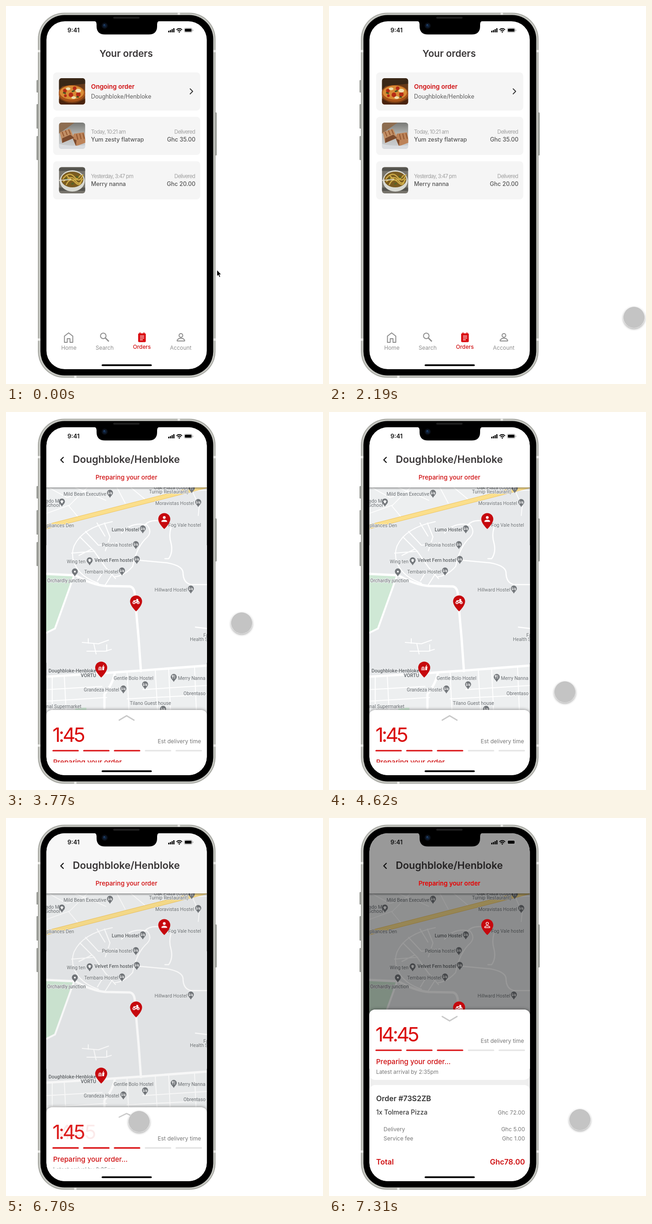
An HTML page that plays this animation: 686 px wide and 817 px high, repeating every 8 s.

```html
<!DOCTYPE html>
<html lang="en">
<head>
<meta charset="utf-8">
<title>Order tracking</title>
<style>
@property --open { syntax: "<number>"; inherits: true; initial-value: 0; }

html, body { margin: 0; width: 100%; height: 100%; overflow: hidden; background: #fff; }
svg { display: block; width: 686px; height: 817px; --open: 0; animation: open 8s step-end infinite; }
text { font: 12px Inter, sans-serif; fill: #777; }
.title { font-size: 20.5px; font-weight: 600; fill: #393637; }
.mid { text-anchor: middle; }
.end { text-anchor: end; }
.red { fill: #cf0d0f; }
.status { font-size: 13.5px; font-weight: 500; }
.meta text { font-size: 11.5px; letter-spacing: -.75px; fill: #a0a0a0; }
.item { font-size: 12.4px; font-weight: 500; fill: #555; }
.line { fill: none; stroke-linecap: round; stroke-linejoin: round; }
.tab { fill: none; stroke: #8e8e8e; stroke-width: 2; stroke-linejoin: round; }
.tabs text { font-size: 11.8px; fill: #8e8e8e; text-anchor: middle; }
.labels text { font: 10.4px Roboto, sans-serif; fill: #6d7175; stroke: #eef0f1; stroke-width: 2px; paint-order: stroke; }
.labels .strong { font-weight: 500; fill: #5d6165; }
.clock { font-size: 43px; font-weight: 400; letter-spacing: -4px; fill: #da0c0c; }
.total { font-size: 16px; font-weight: 600; }

.tracking { animation: reveal 8s step-end infinite; }
.dim { opacity: calc(var(--open) * .4); }
.fade-in { opacity: var(--open); }
.fade-out { opacity: calc(1 - var(--open)); }
.sheet { transform: translateY(calc(644px - 230px * var(--open))); }
.back { filter: drop-shadow(0 -1px 3px #0006); }
.handle { transform: translate(261px, calc(17px + 3px * var(--open))) scaleY(calc(1 - 2 * var(--open))); }
.arrow { animation: arrow 8s step-end infinite; }
.touch { animation: touch 8s step-end infinite; filter: drop-shadow(0 2px 2px #0005); }

@keyframes arrow { 0% { opacity: 1 } 1.625%, 100% { opacity: 0 } }
@keyframes reveal {
  0% { opacity: 0 }
  41.125% { opacity: 0; animation-timing-function: steps(4, start) }
  44.8%, 100% { opacity: 1 }
}
@keyframes open {
  0% { --open: 0 }
  83.75% { --open: .082 }
  84.75% { --open: .42 }
  86.5% { --open: .85 }
  87.4% { --open: .97 }
  88.3%, 100% { --open: 1 }
}
@keyframes touch {
  0% { translate: 457px 571px; opacity: 0 }
  1.625% { translate: 457px 571px; opacity: 1; animation-timing-function: steps(7, start) }
  7.75% { translate: 657px 648px; opacity: 1 }
  9.875% { translate: 657px 648px; animation-timing-function: steps(3, start) }
  12.625% { translate: 660px 682px }
  13.875% { translate: 660px 682px; animation-timing-function: steps(2, start) }
  15.5% { translate: 660px 687px }
  27.375% { translate: 660px 673px }
  28.375% { translate: 660px 673px; animation-timing-function: steps(3, start) }
  31.1875% { translate: 575px 550px; animation-timing-function: steps(2, start) }
  33.0625% { translate: 425px 315px; animation-timing-function: steps(2, start) }
  35% { translate: 351px 207px }
  36.25% { translate: 351px 207px; animation-timing-function: steps(4, start) }
  39.9% { translate: 341px 187px }
  44.125% { translate: 341px 187px; animation-timing-function: steps(4, start) }
  48% { translate: 510px 456px; animation-timing-function: steps(4, start) }
  51.75% { translate: 517px 550px; animation-timing-function: steps(7, start) }
  58.625% { translate: 510.5px 605px }
  67.125% { translate: 510.5px 605px; animation-timing-function: steps(11, start) }
  77.5% { translate: 272px 655px }
  77.625% { translate: 270px 657px }
  79.5% { translate: 270px 657px; animation-timing-function: steps(3, start) }
  82.375% { translate: 268px 658px }
  83.75% { translate: 288px 656px }
  84.75% { translate: 300px 655px }
  86.5% { translate: 300px 655px; animation-timing-function: steps(6, start) }
  92.3%, 100% { translate: 543px 652px; opacity: 1 }
}
</style>
</head>
<body>
<svg viewBox="0 0 686 817">
  <defs>
    <clipPath id="screen"><rect x="87.500" y="33" width="347" height="752" rx="40"/></clipPath>
    <clipPath id="thumb"><rect width="57" height="57" rx="6"/></clipPath>
    <linearGradient id="shade" x2="0" y2="1">
      <stop stop-color="#000" stop-opacity=".36"/><stop offset="1" stop-color="#000" stop-opacity="0"/>
    </linearGradient>
    <linearGradient id="wood" x2="0" y2="1">
      <stop stop-color="#5f3a1d"/><stop offset="1" stop-color="#7a3c12"/>
    </linearGradient>
    <linearGradient id="cloth" x2="0" y2="1">
      <stop stop-color="#787975"/><stop offset=".45" stop-color="#b6b7b5"/><stop offset="1" stop-color="#cfd2d5"/>
    </linearGradient>
    <rect id="card" x="102" width="318.500" height="82.500" rx="8" fill="#f5f5f5"/>
    <path id="drop" d="M0 21S-13 9-13-.500a13 13 0 0 1 26 0C13 9 0 21 0 21z" fill="#c6080d"/>
    <path id="dot" d="M0 9.500C-2 5-6.500 3-6.500-1.500a6.500 6.500 0 0 1 13 0C6.500 3 2 5 0 9.500z" fill="#74787c"/>
    <g id="bed"><use href="#dot"/><path d="M-3.500-4V2M-3.500.500h7V2M-1-2h4.500V.500" class="line" stroke="#fff" stroke-width="1.200"/></g>
    <g id="cap"><use href="#dot"/><path d="M-4-2 0-4.500 4-2 0 .500zM-2 0v2h4V0z" fill="#fff"/></g>
    <g id="fork"><use href="#dot"/><path d="M-2-5v7M2-5v7M-3.200-5v3h2.400v-3" class="line" stroke="#fff"/></g>
  </defs>

  <!-- phone body -->
  <g fill="#999b96">
    <rect x="66" y="160" width="6" height="27" rx="1.500"/><rect x="66" y="212" width="6" height="53" rx="1.500"/>
    <rect x="66" y="281" width="6" height="52" rx="1.500"/><rect x="450" y="230" width="6" height="93" rx="1.500"/>
  </g>
  <rect x="69" y="14.500" width="384.500" height="789" rx="57" fill="#a8a9a3"/>
  <rect x="71" y="16.500" width="380.500" height="785" rx="55" fill="#c6c7c2"/>
  <path d="M374 14.500v5M150 799v5M69 97.500h6M448 97.500h6M69 721h6M448 721h6" stroke="#e9e9e6" stroke-width="5"/>
  <rect x="74.500" y="19.500" width="374" height="779" rx="52"/>

  <g clip-path="url(#screen)">
    <rect x="87" y="33" width="348" height="752" fill="#fff"/>

    <!-- order list -->
    <g>
      <text class="title mid" x="260" y="110">Your orders</text>
      <use href="#card" y="143.500"/><use href="#card" y="239.500"/><use href="#card" y="335.500"/>

      <g transform="translate(114.500 156)" clip-path="url(#thumb)">
        <path d="M0 0h57v57H0z" fill="url(#wood)"/>
        <path d="M0 0h57v12L8 17 0 25z" fill="#392717"/>
        <ellipse cx="28" cy="33" rx="29" ry="18" fill="#a85319"/>
        <ellipse cx="28" cy="31" rx="26" ry="15" fill="#d88b35"/>
        <g fill="#b52b16"><circle cx="13" cy="27" r="4"/><circle cx="26" cy="36" r="5"/><circle cx="42" cy="35" r="5"/><circle cx="34" cy="22" r="4"/><circle cx="14" cy="38" r="3"/></g>
        <g fill="#eedfb0"><ellipse cx="20" cy="23" rx="5" ry="3"/><ellipse cx="42" cy="27" rx="6" ry="4"/><ellipse cx="32" cy="42" rx="5" ry="3"/></g>
        <path d="M9 31l6 2M28 29l6-2M38 40l5 1" stroke="#455021" stroke-width="3"/>
        <path d="M0 44q28 20 57 0v13H0z" fill="#4a230d"/>
      </g>
      <g transform="translate(114.500 252)" clip-path="url(#thumb)">
        <path d="M0 0h57v57H0z" fill="url(#cloth)"/>
        <path d="M0 0h34L0 24z" fill="#8d6d50"/>
        <path d="M2 21 24 13l9 20-26 11z" fill="#c18e64"/><path d="M32 24l22-3 5 22-22 8-7-16z" fill="#bd8358"/>
        <path d="M7 34l18-8 8 7-26 11zM30 34l8 4-1 13z" fill="#7c4b2e"/>
        <path d="M7 20l4 10M14 17l4 10M21 15l4 10M38 25l3 12M45 24l3 12M52 23l3 12" stroke="#91552f" stroke-width="2"/>
        <path d="M0 46q22 6 57 3v8H0z" fill="#d9dce0"/>
      </g>
      <g transform="translate(114.500 348)" clip-path="url(#thumb)">
        <path d="M0 0h57v57H0z" fill="#77746c"/>
        <path d="M0 5h57M0 48h57" stroke="#55544f" stroke-width="7"/>
        <ellipse cx="29" cy="30" rx="27" ry="23" fill="#d9dad3"/>
        <ellipse cx="29" cy="27" rx="24" ry="17" fill="#7a5b20"/>
        <path class="line" d="M9 25q14-17 25-3t18-5M10 31q18-15 26-2t15-3M16 38q8-17 19-5t14-5M17 18q14 20 30 0" stroke="#cfad49" stroke-width="2.500"/>
        <path d="M14 25l5 2M37 20l5 3M27 37l5-2" stroke="#526428" stroke-width="3"/>
        <path d="M0 29l26-2" stroke="#e2dccb" stroke-width="2"/>
      </g>

      <text class="red" x="184" y="179" style="font-size:13.500px;font-weight:600">Ongoing order</text>
      <text x="184" y="200" style="font-size:12.400px;fill:#5c5c5c">Doughbloke/Henbloke</text>
      <path class="line" d="M398.500 179l5.500 5.500-5.500 5.500" stroke="#333" stroke-width="1.800"/>
      <g class="meta">
        <text x="184" y="276">Today, 10:21 am</text><text class="end" x="409" y="276">Delivered</text>
        <text x="184" y="372">Yesterday, 3:47 pm</text><text class="end" x="409" y="372">Delivered</text>
      </g>
      <text class="item" x="184" y="293">Yum zesty flatwrap</text><text class="item end" x="410" y="293">Ghc 35.00</text>
      <text class="item" x="184" y="389">Merry nanna</text><text class="item end" x="410" y="389">Ghc 20.00</text>

      <g class="tabs">
        <path class="tab" d="M126.500 713.500 135.500 706.500l9 7V727h-6v-8h-6v8h-6z"/>
        <g class="tab"><circle cx="210.500" cy="713" r="6"/><path d="M215 717.500l7.500 7.500" stroke-width="2.600"/>
          <circle cx="378.500" cy="712" r="4"/><path d="M370.500 724v-2q3-4 8-4t8 4v2z"/></g>
        <rect x="286" y="707.500" width="16.500" height="19" rx="2" fill="#da0b10"/>
        <path d="M290 705.500v4M298.500 705.500v4" stroke="#da0b10" stroke-width="2"/>
        <path d="M290 713.500h9M290 717.500h9M290 721.500h6" stroke="#fff" stroke-width="1.700"/>
        <text x="136" y="743">Home</text><text x="213.500" y="743">Search</text>
        <text x="294" y="741" style="fill:#cf0d0f;font-weight:500">Orders</text><text x="378" y="743">Account</text>
      </g>
    </g>

    <!-- live map -->
    <g class="tracking">
      <rect x="87" y="33" width="348" height="752" fill="#e7e9eb"/>
      <path d="M87 163h348v2L87 246zM87 571l348-22v236H87z" fill="#edeff0"/>
      <path d="M87 350l60 4-43 116-17 7zM150 639h24v7h-24z" fill="#cfe8d5"/>
      <g class="line" stroke="#fff">
        <path stroke-width="1.700" d="M92 163l40 22 40-14 44 20M150 163l22 10M176 163l-40 40 20 24M240 163l18 34M270 163l30 25M330 163l12 14M88 219l50-18M360 172l75-3M400 164l18 40-2 20"/>
        <path stroke-width="2.200" d="M230 237Q165 250 147 290Q138 315 155 340Q170 360 200 370M160 270l30 30 25 35 22 25M172 258l28 30 40-5M197 240l17 28M213 240l12 30-10 30M142 305l50-4M250 262q20-25 55-18 14 16-3 30-20 20-28 60-18 20-38 22M186 296l-28 14M210 345l-12 20M230 350l-16 25"/>
        <path stroke-width="2.600" d="M300 245q10-14 38-9M357 250q-5 17 0 33 5 20-5 34h-8M283 320l66 6q32 6 34 20 0 24 18 27h34M410 465l25 3"/>
        <path stroke-width="2" d="M165 498l35 3 22-8M178 500v-10M190 501l5 22M175 517h40l13-4M218 517v-14"/>
        <path stroke-width="2" d="M100 570v75M126 568l4 77M88 600l120-7M88 625l130-8M262 562l4 82M323 557l5 90M352 555l4 90M408 552l4 94M296 600l139-9M262 620l173-9"/>
        <path stroke-width="4" d="M147 354l-41 114-18 9"/>
        <path stroke-width="5" d="M88 350l62 3q35 20 65 23l53 1q11 2 11 22l8 91 5 70M88 572l115-7 87-6 145-11M236 563q-5 25-23 47v30"/>
      </g>
      <path d="M80 250 440 158" stroke="#efc560" stroke-width="10"/>
      <path d="M80 250 440 158" stroke="#fbdf8c" stroke-width="8"/>

      <g class="labels">
        <text class="end" x="217" y="181">Mild Bean Executive</text>
        <text x="86" y="196">ado M|</text><text x="85" y="205">School</text>
        <text x="88" y="249">pliances Den</text>
        <text x="320" y="167">Oak Plaza (Copper</text><text class="end" x="395" y="176">Turnip Restaurant)</text>
        <text class="end" x="407" y="201">Moravistas Hostel</text>
        <text x="351" y="248">Fog Vale hostel</text>
        <text class="end strong" x="288" y="258">Lumo Hostel</text>
        <text class="end" x="273" y="291">Pelonia hostel</text>
        <text class="end" x="172" y="327">Wing ten</text>
        <text class="end strong" x="275" y="324">Velvet Fern hostel</text>
        <text class="end" x="243" y="349">Tembaro Hostel</text>
        <text x="89" y="368">Orchardly junction</text>
        <text class="end" x="392" y="388">Hillward Hostel</text>
        <text x="427" y="486">Fa</text><text x="398" y="495">Health S</text>
        <text class="end strong" x="195" y="563">Doughbloke-Henbloke</text><text class="end strong" x="195" y="573">VORTU</text>
        <text x="233" y="579">Gentle Bolo Hostel</text><text x="372" y="579">Merry Nanna</text>
        <text class="end" x="245" y="604">Grandeza Hostel</text><text x="384" y="612">Obrentaso h</text>
        <text x="268" y="633">Tilano Guest house</text><text x="84" y="640">rnal Supermarket</text>
      </g>
      <use href="#bed" x="225" y="176"/><use href="#bed" x="416" y="196"/><use href="#bed" x="296" y="253"/>
      <use href="#bed" x="281" y="287"/><use href="#bed" x="283" y="319"/><use href="#bed" x="251" y="344"/>
      <use href="#bed" x="400" y="383"/><use href="#bed" x="254" y="599"/><use href="#bed" x="301" y="590"/><use href="#bed" x="340" y="643"/>
      <use href="#cap" x="121" y="195"/><use href="#cap" x="181" y="322"/>
      <use href="#fork" x="363" y="574"/><use href="#fork" x="402" y="166"/>
      <use href="#dot" x="149" y="346"/><circle cx="149" cy="345" r="2" fill="#fff"/>

      <rect x="87" y="163" width="348" height="5" fill="url(#shade)"/>
      <rect x="87" y="33" width="348" height="130" fill="#fff"/>
      <path class="line" d="M124 98l-5.500 5.500L124 109" stroke="#111" stroke-width="2.200"/>
      <text class="title" x="144.500" y="110" style="font-size:21.500px">Doughbloke/Henbloke</text>
      <rect class="dim" x="87" y="33" width="348" height="752"/>
      <g class="status">
        <text class="status mid red" x="260.500" y="145.500">Preparing your order</text>
        <text class="status mid fade-in" x="260.500" y="145.500" fill="#e90808" style="fill:#e90808">Preparing your order</text>
      </g>

      <!-- route pins -->
      <g transform="translate(342.500 232)">
        <use href="#drop"/>
        <g class="fade-out" fill="#fff"><circle cy="-4" r="3"/><path d="M-6 5.500V3q6-4.500 12 0v2.500z"/></g>
        <g class="fade-in line" stroke="#fff" stroke-width="1.300"><circle cy="-4" r="2.700"/><path d="M-5.500 5V3q5.500-4 11 0v2z"/></g>
      </g>
      <g transform="translate(281.500 410)">
        <use href="#drop"/>
        <g class="line" stroke="#fff" stroke-width="1.600"><circle cx="-4.500" cy="2" r="2.300"/><circle cx="4.500" cy="2" r="2.300"/><path d="M-5-2h5l3 1M-2 2h3l2.500-4L1-5h2.500l1 6" stroke-width="1.900"/></g>
      </g>
      <g transform="translate(206 553)">
        <use href="#drop"/>
        <path d="M-6.500-.500q4-4 8 0zM-6.500.700h8v1.600h-8zM-6.500 3.500h8V5h-8zM2.500-3H7L6 5H2.500zM4-3v-3h2v1H5v2z" fill="#fff"/>
      </g>

      <!-- order sheet -->
      <g class="sheet">
        <path class="back" d="M87 14q0-14 14-14h320q14 0 14 14v380H87z" fill="#efefef"/>
        <rect x="87" width="348" height="152" rx="13" fill="#fff"/>
        <rect x="87" y="163" width="348" height="240" rx="13" fill="#fff"/>
        <path class="handle line" d="M-16 5 0-4.500 16 5" stroke="#c9c9c9" stroke-width="2.800"/>
        <text class="clock fade-out" x="100.500" y="68.500">1:45</text>
        <text class="clock fade-in" x="100.500" y="68.500">14:45</text>
        <text class="end" x="422" y="71.500">Est delivery time</text>
        <path class="line" d="M102 88h54M168.500 88h54M235 88h54" stroke="#da0f12" stroke-width="3.200"/>
        <path class="line" d="M302 88h54M368.500 88h54" stroke="#e4e4e4" stroke-width="3.200"/>
        <text class="red" x="102" y="117.500" style="font-size:15px;font-weight:500">Preparing your order...</text>
        <text x="102" y="139" style="font-size:11.800px">Latest arrival by 2:35pm</text>
        <text x="102" y="198" style="font-size:16px;font-weight:600;fill:#343434">Order #73S2ZB</text>
        <text x="102" y="227" style="font-size:14px;font-weight:500;fill:#3b3b3b">1x Tolmera Pizza</text><text class="end" x="424" y="227">Ghc 72.00</text>
        <text x="118" y="263">Delivery</text><text class="end" x="424" y="263">Ghc 5.00</text>
        <text x="118" y="283">Service fee</text><text class="end" x="424" y="283">Ghc 1.00</text>
        <text class="red total" x="102" y="335">Total</text><text class="red total end" x="424" y="335">Ghc78.00</text>
      </g>
      <rect x="87" y="757.500" width="348" height="28" fill="#fff"/>
    </g>

    <!-- status bar -->
    <text x="133" y="57" style="font-size:13px;font-weight:600;fill:#111">9:41</text>
    <path d="M351 53.500h2.500V57H351zM354.700 52h2.500v5h-2.500zM358.400 50h2.500v7h-2.500zM362 48h2.500v9H362z"/>
    <path class="line" d="M369.500 51q5.500-4.500 11 0M371.800 53.500q3.200-2.500 6.400 0" stroke="#000" stroke-width="1.900"/>
    <circle cx="375" cy="56" r="1.500"/>
    <rect x="385.500" y="47.500" width="17.500" height="9.500" rx="3" fill="none" stroke="#aaa"/>
    <rect x="387" y="49" width="14.500" height="6.500" rx="1.600"/><path d="M404.500 51v3" stroke="#999"/>
    <rect x="207" y="774.500" width="108.500" height="3.800" rx="1.900"/>
  </g>

  <!-- notch -->
  <path d="M190 32.500q6 0 6 7v4q0 18 18 18h95q18 0 18-18v-4q0-7 6-7z"/>
  <rect x="232" y="23" width="57" height="4.500" rx="2.200" fill="#1d1d1d"/>
  <circle cx="213.500" cy="42.500" r="6.500" fill="#0c121c"/><circle cx="213.500" cy="42.500" r="3.500" fill="#10243f"/><circle cx="212.500" cy="41" r="1.200" fill="#315d90"/>

  <path class="arrow" d="M456.500 570.500v13.500l3-2.700 2.200 5 2.300-1-2.200-4.800h4z" stroke="#fff" stroke-width=".8"/>
  <g class="touch"><circle r="23.500" fill="#fff"/><circle r="22.500" fill="#c4c4c4" stroke="#b5b5b5" stroke-width=".6"/></g>
</svg>
</body>
</html>
```
